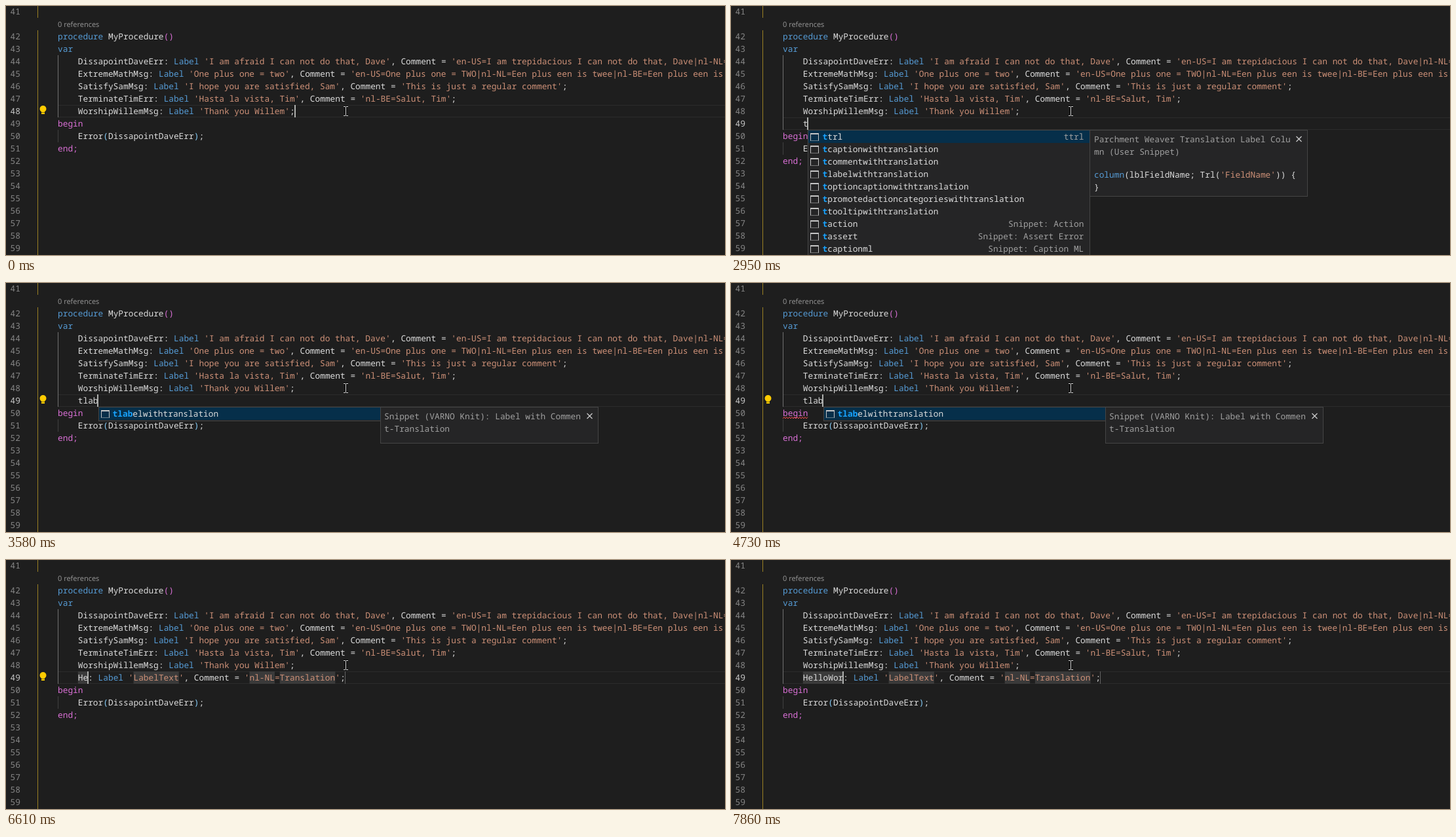
An HTML page with a canvas for the animation above (8000 ms loop, 1097 by 380 pixels).

```html
<!DOCTYPE html>
<html lang="en">
<head>
<meta charset="utf-8">
<title>Snippet completion</title>
<style>
  html, body { margin: 0; width: 100%; height: 100%; overflow: hidden; background: #1e1e1e; }
  canvas { display: block; }
</style>
</head>
<body>
<canvas id="stage" width="1097" height="380"></canvas>
<script>
const ctx = document.getElementById('stage').getContext('2d');
const LOOP = 8000, ROW = 19, LEFT = 79, CELL = 7.697;
const MONO = `${CELL / 0.6}px "Noto Sans Mono", monospace`;
const TEXT = '#dcdcdc', BLUE = '#569cd6', STRING = '#ce9178', PINK = '#da70d6', SKY = '#87cefa', DIM = '#a0a0a0';

const HEAD = [
  'procedure MyProcedure()',
  'var',
  "    DissapointDaveErr: Label 'I am afraid I can not do that, Dave', Comment = 'en-US=I am trepidacious I can not do that, Dave|nl-NL=Het spijt me, Dave';",
  "    ExtremeMathMsg: Label 'One plus one = two', Comment = 'en-US=One plus one = TWO|nl-NL=Een plus een is twee|nl-BE=Een plus een is twee';",
  "    SatisfySamMsg: Label 'I hope you are satisfied, Sam', Comment = 'This is just a regular comment';",
  "    TerminateTimErr: Label 'Hasta la vista, Tim', Comment = 'nl-BE=Salut, Tim';",
  "    WorshipWillemMsg: Label 'Thank you Willem';",
];
const TAIL = ['begin', '    Error(DissapointDaveErr);', 'end;'];

const FIRST_ITEMS = [
  ['ttrl', 'ttrl'], ['tcaptionwithtranslation'], ['tcommentwithtranslation'], ['tlabelwithtranslation'],
  ['toptioncaptionwithtranslation'], ['tpromotedactioncategorieswithtranslation'], ['ttooltipwithtranslation'],
  ['taction', 'Snippet: Action'], ['tassert', 'Snippet: Assert Error'], ['tcaptionml', 'Snippet: Caption ML'],
];
const LABEL_ITEMS = [
  ['tlabelwithtranslation'], ['tcontroladdin', 'Snippet: Control Add-In'], ['tenumvalue', 'Snippet: Enum Value'],
  ['ttable', 'Snippet: Table'], ['ttableext', 'Snippet: Table Extension'], ['tcaseelse', 'Snippet: Case Else'],
  ['teventinternal', 'Snippet: Internal Event'], ['tpagefield', 'Snippet: Page Field'],
  ['ttooltipwithtranslation'], ['tcaptionml', 'Snippet: Caption ML'],
];

const TYPED = [[0, ''], [2700, 't'], [3020, 'tl'], [3250, 'tla'], [3480, 'tlab'], [4980, 'LabelName'], [6220, 'H'],
  [6450, 'He'], [6760, 'Hel'], [6950, 'Hell'], [7160, 'Hello'], [7480, 'HelloW'], [7680, 'HelloWo'], [7860, 'HelloWor']];
const CARET_OFF = [[70, 530], [1080, 1540], [2090, 2320], [4030, 4580], [5440, 5910]];
const BULB = [[0, 2320], [3580, 4980], [6610, 7480]];
const SQUIGGLE = [[4730, 5740]];

const within = (t, spans) => spans.some(([a, b]) => t >= a && t < b);
const lineTop = n => n < 42 ? -1 : 37 + (n - 42) * ROW;
const colX = col => LEFT + col * CELL;

function rect(x, y, w, h, color) {
  ctx.fillStyle = color;
  ctx.fillRect(x, y, w, h);
}

function text(str, x, y, color = TEXT, font = MONO) {
  ctx.font = font;
  ctx.fillStyle = color;
  ctx.fillText(str, x, y);
}

function stroke(points, color, width = 1) {
  ctx.beginPath();
  points.forEach(([x, y]) => ctx.lineTo(x, y));
  ctx.strokeStyle = color;
  ctx.lineWidth = width;
  ctx.stroke();
}

function code(str, x, y) {
  for (const { 0: token, index } of str.matchAll(/'[^']*'|\w+|[()]|[^\s\w'()]+/g)) {
    let color = TEXT;
    if (token[0] === "'") color = STRING;
    else if (/^(procedure|var|Label|column)$/.test(token)) color = BLUE;
    else if (/^(begin|end)$/.test(token) || str === 'end;') color = PINK;
    else if (/[()]/.test(token)) color = str.startsWith('column') ? TEXT : str.includes('Error(') ? SKY : PINK;
    text(token, x + index * CELL, y, color);
  }
}

function panel(x, y, w, h) {
  rect(x, y, w, h, '#454545');
  rect(x + 1, y + 1, w - 2, h - 2, '#252526');
}

function bulb(top) {
  ctx.fillStyle = '#ffcc00';
  ctx.beginPath();
  ctx.arc(56.5, top + 6, 5, 0, 7);
  ctx.fill();
  rect(54, top + 9, 5, 5, '#ffcc00');
  rect(54, top + 11, 5, 1, '#8a7010');
}

function snippetIcon(x, y) {
  rect(x, y, 13, 2, '#c5c5c5');
  rect(x, y, 1, 12, '#c5c5c5');
  rect(x + 12, y, 1, 12, '#c5c5c5');
  for (let i = 0; i < 13; i += 2) rect(x + i, y + 11, 1, 1, '#c5c5c5');
}

function matchIndices(name, query) {
  const rest = query.slice(1), start = name.indexOf(rest, 1);
  return new Set([0, ...[...rest].map((ch, i) => start > 0 ? start + i : name.indexOf(ch, 1))]);
}

function suggestions(query, t) {
  const x = colX(4 + query.length), left = Math.round(x), right = Math.round(x + 430);
  const items = query === 't' ? FIRST_ITEMS : query === 'tlab' ? LABEL_ITEMS.slice(0, 1) : LABEL_ITEMS;
  panel(left, 189, right - left + 1, items.length * ROW + 3);
  rect(left + 1, 190, right - left - 1, ROW, '#062f4a');
  items.forEach(([name, note = ''], i) => {
    const y = 204 + i * ROW, hits = matchIndices(name, query);
    snippetIcon(left + 4, y - 10);
    [...name].forEach((ch, k) => hits.has(k)
      ? text(ch, x + 22 + k * CELL, y, '#18a3ff', 'bold ' + MONO)
      : text(ch, x + 22 + k * CELL, y));
    text(note, x + 421 - note.length * CELL, y, DIM);
  });
  if (items === LABEL_ITEMS) rect(right - 9, 190, 10, 174, '#4b4b4b');
  if (t >= 2950) details(x + 430, t < 3100);
}

function details(x, columnSnippet) {
  const left = Math.round(x), tx = x + 6.5;
  panel(left, 189, 333, columnSnippet ? 102 : 56);
  const lines = columnSnippet
    ? ['Parchment Weaver Translation Label Colu', 'mn (User Snippet)']
    : ['Snippet (VARNO Knit): Label with Commen', 't-Translation'];
  lines.forEach((line, i) => text(line, tx, 208 + i * ROW, DIM));
  if (columnSnippet) {
    code("column(lblFieldName; Trl('FieldName')) {", tx, 262);
    code('}', tx, 281);
  }
  const cx = left + 319.5;
  stroke([[cx - 4, 199], [cx + 4, 207]], '#cccccc', 1.3);
  stroke([[cx + 4, 199], [cx - 4, 207]], '#cccccc', 1.3);
}

function placeholders(name, top, selected) {
  const n = name.length;
  [[4, n], [13 + n, 9], [36 + n, 5], [42 + n, 11]].forEach(([col, len]) =>
    rect(colX(col), top, len * CELL, ROW, '#3a3a3a'));
  if (selected) rect(colX(4), top, n * CELL, ROW, '#264f78');
  rect(Math.round(colX(55 + n)) - 1, top, 1, ROW, '#626262');
}

function mousePointer() {
  for (const [color, width] of [['#000', 3], ['#e8e8e8', 1]]) {
    stroke([[518.5, 154], [518.5, 167]], color, width);
    for (const y of [153.5, 167.5]) {
      stroke([[515, y], [518, y]], color, width);
      stroke([[519, y], [522, y]], color, width);
    }
  }
}

function draw(t) {
  const typed = TYPED.findLast(([at]) => t >= at)[1];
  const added = t >= 2320, inserted = t >= 4980, selected = inserted && t < 6220;
  const active = added ? 49 : 48, top = lineTop(active);
  const newLine = '    ' + typed + (inserted ? ": Label 'LabelText', Comment = 'nl-NL=Translation';" : '');
  const lines = added ? [...HEAD, newLine, ...TAIL] : [...HEAD, ...TAIL];

  rect(0, 0, 1097, 380, '#1e1e1e');
  if (!selected) {
    rect(LEFT, top, 1018, 1, '#2c2c2c');
    rect(LEFT, top + ROW - 1, 1018, 1, '#2c2c2c');
  }
  rect(48, 0, 1, 18, '#9a8023');
  rect(48, 37, 1, 343, '#9a8023');
  for (let n = 41; n < 60; n++) text(n, 6.6, lineTop(n) + 14, n === active ? '#c6c6c6' : '#858585');
  text('0 references', LEFT, 32, '#999999', '11px "Open Sans", sans-serif');

  rect(LEFT, 75, 1, top + ROW - 75, selected ? '#404040' : '#707070');
  rect(LEFT, lineTop(active + 2), 1, ROW, '#404040');
  if (inserted) placeholders(typed, top, selected);
  lines.forEach((line, i) => code(line, LEFT, lineTop(42 + i) + 14));

  if (within(t, SQUIGGLE)) {
    const wave = Array.from({ length: 20 }, (_, i) => [LEFT + i * 2, i % 2 ? 204.5 : 207]);
    stroke(wave, '#f14c4c');
  }
  if (within(t, BULB)) bulb(top);
  if (t >= 2800 && !inserted) suggestions(typed, t);
  if (!within(t, CARET_OFF)) {
    const col = added ? 4 + typed.length : HEAD[6].length;
    rect(Math.round(colX(col) - 1.1), top, 2, ROW, '#aeafad');
  }
  mousePointer();
}

ctx.textRendering = 'geometricPrecision';
(function tick() {
  draw(performance.now() % LOOP);
  requestAnimationFrame(tick);
})();
</script>
</body>
</html>
```
